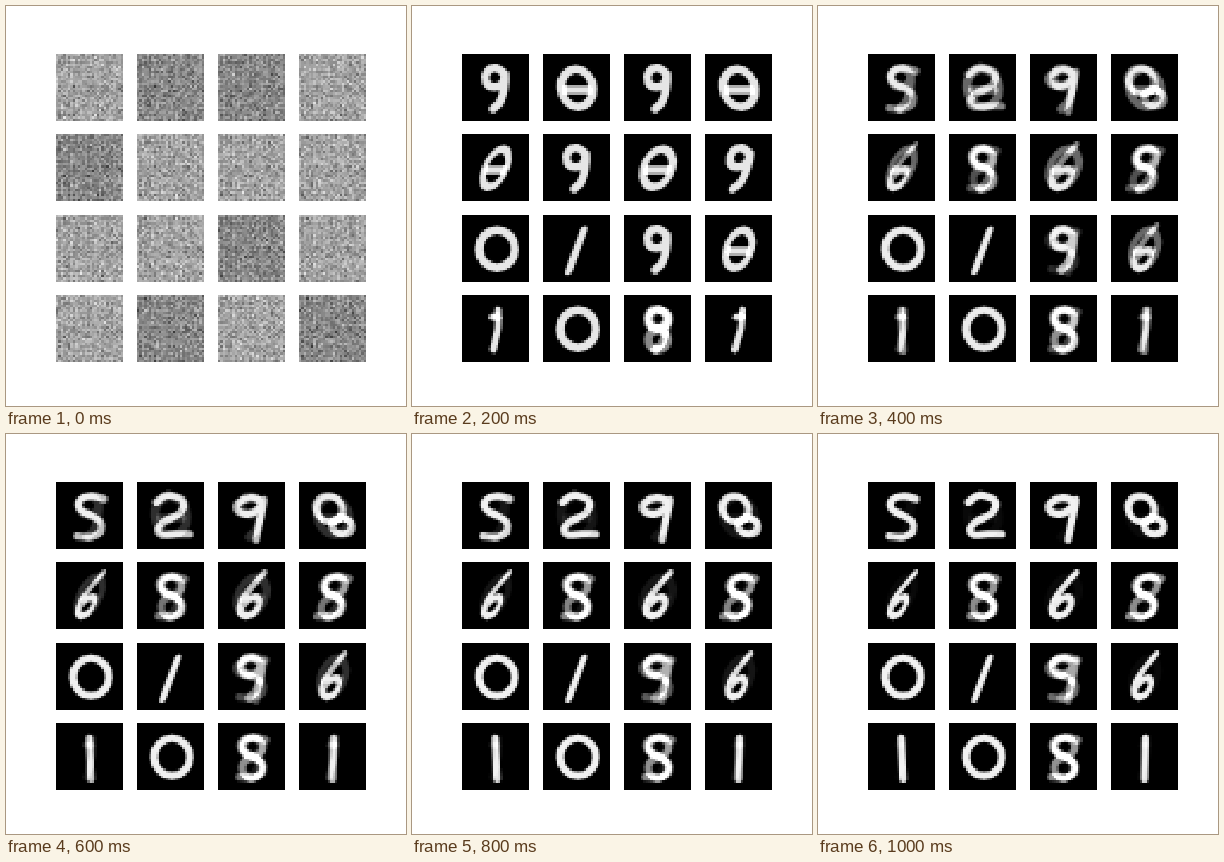
These frames come from a looping animation (400x400 px, 1.1 s). An HTML page with a canvas:

```html
<!DOCTYPE html>
<html lang="en">
<head>
<meta charset="utf-8">
<title>Digits emerging from noise</title>
<style>
  html, body { margin: 0; width: 100%; height: 100%; overflow: hidden; background: #fff; }
  canvas { display: block; width: 400px; height: 400px; }
</style>
</head>
<body>
<canvas id="stage" width="400" height="400"></canvas>
<script>
const STEPS = 11, STEP_MS = 100;
const GRID = 28, SIZE = 67, PITCH = 80.6, LEFT = 50, TOP = 48;

// Glyphs live in a 67 px cell; a stroke is a path and a width factor.
const GLYPHS = {
  zero: [oval(35, 34, 18, 19)],
  theta: [oval(34, 34, 16, 19), curve('23,36 45,36')],
  egg: [oval(34, 26, 12, 11), curve('23,45 46,45', 1.8)],
  one: [curve('34,15 34,56')],
  flag: [curve('37,15 36,32 33,44 30,55', 0.8), curve('31,22 36,22', 0.8)],
  nine: [curve('43,20 34,14 25,18 24,28 32,33 41,29 43,20 42,36 38,48 31,55')],
  flatNine: [curve('46,20 33,16 20,21 20,29 30,32 40,27 46,18 42,38 38,58')],
  ess: [curve('48,17 36,14 24,18 24,27 34,33 44,39 45,49 36,55 21,54')],
  eight: [oval(35, 24, 10, 9), oval(34, 45, 10, 10)],
  two: [curve('20,20 32,13 47,19 43,31 28,39 20,47 24,53 38,52 52,52')],
  knot: [oval(31, 27, 13, 13), oval(42, 44, 10, 8)],
  six: [curve('42,11 32,24 24,38 25,50 35,54 43,47 42,37 33,36 25,46')]
};
// Glyphs whose first, still unresolved look is a filled shape
const ROUGH = { zero: 'egg', theta: 'egg' };

const cell = (early, late, look) =>
  ({ early, late, slant: 0, stretch: 1, pace: 2.5, grey: 162, ...look });
const DARK = { grey: 135 };

const CELLS = [
  cell('nine', 'ess'),
  cell('theta', 'two', { slant: -0.06, ...DARK }),
  cell('nine', 'flatNine', DARK),
  cell('theta', 'knot', { slant: -0.1 }),
  cell('theta', 'six', { slant: 0.35, stretch: 0.7, ...DARK }),
  cell('nine', 'ess+eight'),
  cell('theta', 'six', { slant: 0.22, stretch: 0.9 }),
  cell('nine', 'ess+eight', { slant: 0.15 }),
  cell('zero', 'zero'),
  cell('one', 'one', { slant: 0.37, stretch: 0.9 }),
  cell('nine', 'ess+flatNine', { pace: 6, ...DARK }),
  cell('theta', 'six', { slant: 0.22, stretch: 0.8 }),
  cell('flag', 'one', { slant: -0.05 }),
  cell('zero', 'zero', DARK),
  cell('nine+eight', 'ess+eight'),
  cell('flag', 'one', { slant: 0.02, ...DARK })
];

function oval(x, y, rx, ry) {
  const path = new Path2D();
  path.ellipse(x, y, rx, ry, 0, 0, Math.PI * 2);
  return { path, weight: 1 };
}

// Smooth path through the given points
function curve(points, weight = 1) {
  const p = points.split(' ').map(s => s.split(',').map(Number));
  const at = i => p[Math.max(0, Math.min(p.length - 1, i))];
  const path = new Path2D();
  path.moveTo(...p[0]);
  for (let i = 0; i < p.length - 1; i++) {
    const [a, b, c, d] = [-1, 0, 1, 2].map(k => at(i + k));
    path.bezierCurveTo(
      b[0] + (c[0] - a[0]) / 6, b[1] + (c[1] - a[1]) / 6,
      c[0] - (d[0] - b[0]) / 6, c[1] - (d[1] - b[1]) / 6, c[0], c[1]);
  }
  return { path, weight };
}

function makeCanvas(size) {
  const canvas = document.createElement('canvas');
  canvas.width = canvas.height = size;
  return canvas;
}

function randomFrom(seed) {
  return () => {
    seed = (Math.imul(seed, 1664525) + 1013904223) >>> 0;
    return seed / 4294967296;
  };
}

const tile = makeCanvas(GRID);
const pen = tile.getContext('2d', { willReadFrequently: true });

function drawNoise(grey, index) {
  const shared = randomFrom(71), own = randomFrom(900 + index * 37);
  const bell = rnd => rnd() + rnd() + rnd() - 1.5;
  for (let y = 0; y < GRID; y++) {
    for (let x = 0; x < GRID; x++) {
      const weave = x % 2 && y % 2 ? -15 : 5;
      const v = Math.round(grey + weave + 30 * bell(shared) + 30 * bell(own));
      pen.fillStyle = `rgb(${v},${v},${v})`;
      pen.fillRect(x, y, 1, 1);
    }
  }
}

// A name such as 'ess+eight' overlays both glyphs at partial strength.
function drawGlyphs(names, width, strength) {
  const list = names.split('+');
  pen.globalAlpha = strength * (list.length > 1 ? 0.6 : 1);
  for (const name of list) {
    for (const { path, weight } of GLYPHS[name]) {
      pen.lineWidth = width * weight;
      pen.stroke(path);
    }
  }
}

function drawDigit({ early, late, slant, stretch, pace }, step) {
  const half = SIZE / 2;
  pen.fillStyle = '#000';
  pen.fillRect(0, 0, GRID, GRID);
  pen.save();
  pen.scale(GRID / SIZE, GRID / SIZE);
  pen.transform(stretch, 0, -slant, 1, half * (1 - stretch + slant), 0);
  pen.lineCap = pen.lineJoin = 'round';
  pen.strokeStyle = '#fff';
  pen.globalCompositeOperation = 'lighter';
  if (step === 1) {
    pen.filter = 'blur(0.95px)';
    drawGlyphs(ROUGH[early] || early, 13, 1);
  } else {
    const mix = 1 - Math.exp((2 - step) / pace);
    pen.filter = 'blur(0.7px)';
    drawGlyphs(early, 8.5, 0.9 * (1 - mix));
    drawGlyphs(late, 7.5, 0.95 * mix);
  }
  pen.restore();
}

function renderStep(step) {
  const sheet = makeCanvas(400), ctx = sheet.getContext('2d');
  ctx.fillStyle = '#fff';
  ctx.fillRect(0, 0, 400, 400);
  ctx.imageSmoothingEnabled = false;
  CELLS.forEach((look, i) => {
    if (step === 0) drawNoise(look.grey, i);
    else drawDigit(look, step);
    const x = LEFT + (i % 4) * 81, y = Math.floor(TOP + (i >> 2) * PITCH);
    ctx.drawImage(tile, x, y, SIZE, SIZE);
  });
  return sheet;
}

const sheets = Array.from({ length: STEPS }, (_, step) => renderStep(step));
const stage = document.getElementById('stage').getContext('2d');
let shown = -1;

function tick() {
  const step = Math.floor(performance.now() / STEP_MS) % STEPS;
  if (step !== shown) stage.drawImage(sheets[shown = step], 0, 0);
  requestAnimationFrame(tick);
}
tick();
</script>
</body>
</html>
```
